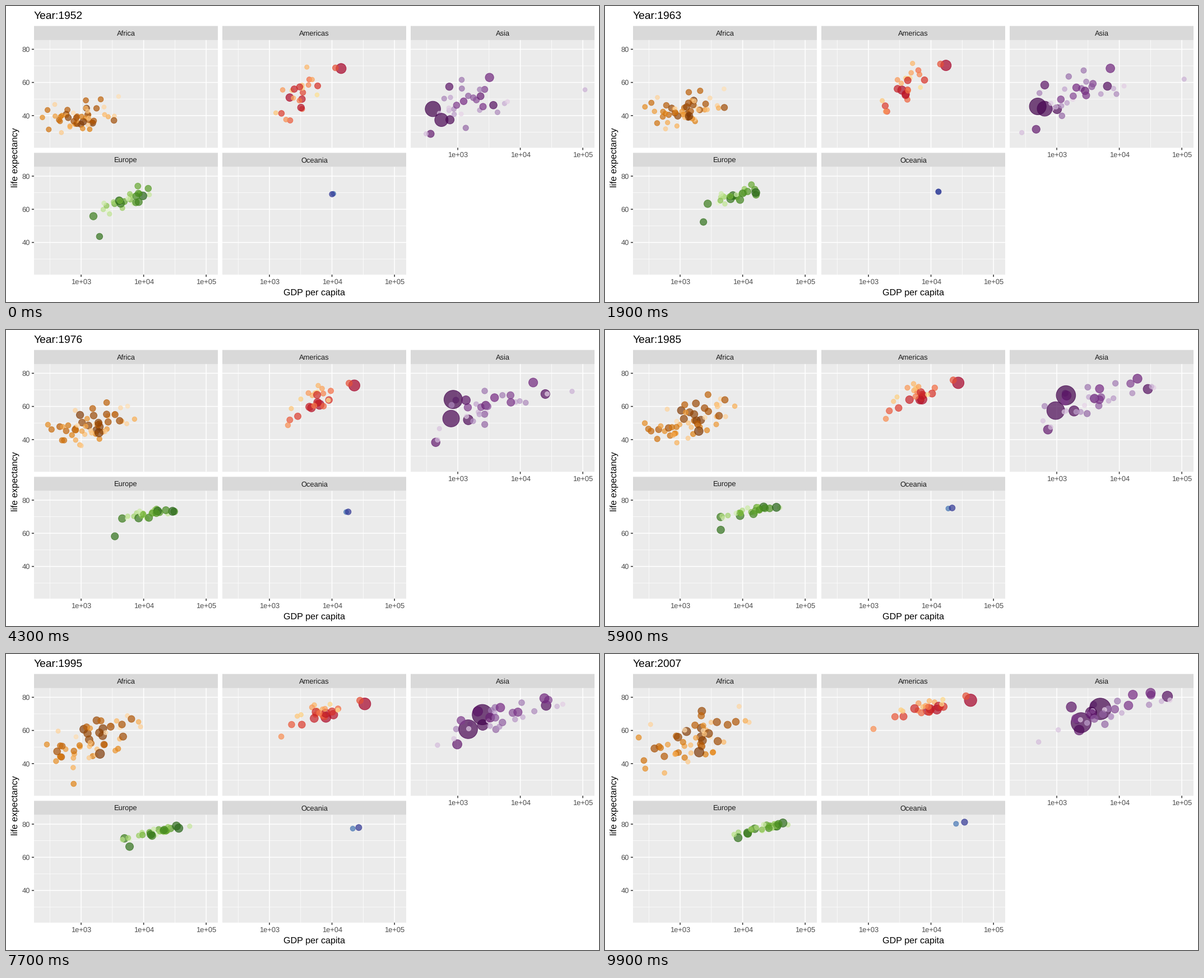
A matplotlib script for the animation above (10 s loop, 1058 by 529 pixels).

```python
import matplotlib.pyplot as plt
import numpy as np
from matplotlib.animation import FuncAnimation
from matplotlib.colors import LinearSegmentedColormap
from matplotlib.patches import Rectangle

W, H, DPI = 1058, 529, 100
PX = 72 / DPI              # points per pixel
PT = 1.463                 # pixels per point of the plot theme
FRAMES = 100
YEARS = np.linspace(1952, 2007, FRAMES)
WAVES = np.arange(1952, 2008, 5)
ERAS = (1952, 1972, 1992, 2007)
PANEL_W, PANEL_H, STRIP_H = 328, 192.5, 25.2
LOG_MIN, LOG_PX = 2.2486, 111.56
LIFE_MAX, LIFE_PX = 85.553, 2.963
POP_MIN, POP_MAX = .06, 1319   # millions

plt.rcParams["font.family"] = "Liberation Sans"
plt.rcParams["text.hinting"] = "none"
rng = np.random.default_rng(7)

# title, left, top of plot area, colours from most to least populous
PANELS = [
    ("Africa", 50, 60.9, ["#7F3B08", "#B35806", "#E08214", "#FDB863", "#FEE0B6"]),
    ("Americas", 386, 60.9, ["#A50026", "#D73027", "#F46D43", "#FDAE61", "#FEE090"]),
    ("Asia", 722, 60.9, ["#40004B", "#762A83", "#9970AB", "#C2A5CF", "#E7D4E8"]),
    ("Europe", 50, 287.6, ["#276419", "#4D9221", "#7FBC41", "#B8E186", "#E6F5D0"]),
    ("Oceania", 386, 287.6, ["#313695", "#4575B4"]),
]

# Clouds of ordinary countries. For each era: mean and spread of log income,
# mean life expectancy, years of life per decade of income, spread around that.
CLOUDS = {
    "Africa": dict(count=50, largest=80, growth=3.6, eras=[
        (2.99, .29, 39.1, 5, 4.6), (3.16, .32, 47.5, 8, 5.2),
        (3.17, .37, 54, 15, 6), (3.22, .42, 54.8, 10, 7.5)]),
    "Americas": dict(count=21, largest=109, growth=3.2, eras=[
        (3.48, .18, 53, 22, 6.5), (3.70, .18, 62.3, 18, 4.5),
        (3.76, .20, 69.8, 11, 2.8), (3.90, .23, 73.6, 9, 2)]),
    "Asia": dict(count=28, largest=170, growth=3.2, eras=[
        (3.13, .33, 46.5, 10, 7.5), (3.41, .46, 57, 11, 6),
        (3.60, .50, 66.3, 10, 4.5), (3.76, .50, 70.5, 9, 4)]),
    "Europe": dict(count=29, largest=82, growth=1.25, eras=[
        (3.70, .24, 65.1, 18, 2.5), (4.06, .19, 71, 7, 1.4),
        (4.15, .27, 74.5, 9, 1), (4.34, .23, 77.7, 8, 1)]),
}

# Outstanding countries: population at start and end,
# then a few bends given as (year, income, life expectancy).
LEADERS = {
    "Africa": [
        (33, 135, (1952, 1077, 36.3), (1977, 1981, 44.5), (2007, 2014, 46.9)),
        (2.5, 8.9, (1952, 493, 40), (1987, 848, 44), (1992, 737, 23.6), (2007, 863, 46.2)),
    ],
    "Americas": [
        (158, 301, (1952, 13990, 68.4), (2007, 42952, 78.2)),
        (15, 33, (1952, 11367, 68.8), (2007, 36319, 80.7)),
        (57, 190, (1952, 2109, 50.9), (1977, 6660, 61.5), (2007, 9066, 72.4)),
        (3.2, 8.5, (1952, 1840, 37.6), (1982, 2011, 51.5), (2007, 1202, 60.9)),
    ],
    "Asia": [
        (556, 1319, (1952, 400, 44), (1962, 488, 44.5), (1972, 677, 63.1), (2007, 4959, 73)),
        (372, 1110, (1952, 547, 37.4), (1982, 856, 56.6), (2007, 2452, 64.7)),
        (82, 224, (1952, 750, 37.5), (2007, 3541, 70.7)),
        (86, 127, (1952, 3217, 63), (1972, 14779, 73.4), (2007, 31656, 82.6)),
        (.2, 2.5, (1952, 108382, 55.6), (1972, 109348, 67.7), (1982, 31354, 71.3), (2007, 47307, 77.6)),
    ],
    "Europe": [
        (22, 71, (1952, 1969, 43.6), (1962, 2323, 52.1), (2007, 8458, 71.8)),
    ],
    "Oceania": [
        (8.7, 20.4, (1952, 10040, 69.1), (1972, 16789, 71.9), (2007, 34435, 81.2)),
        (2, 4.1, (1952, 10557, 69.4), (1972, 16046, 71.9), (2007, 25185, 80.2)),
    ],
}


def drift(count, memory=.97):
    """Slowly wandering standard scores, one row per wave."""
    z = rng.normal(size=count)
    rows = []
    for _ in WAVES:
        z = (z - z.mean()) / z.std()
        rows.append(np.clip(z, -2.1, 2.1))
        z = memory * z + np.sqrt(1 - memory ** 2) * rng.normal(size=count)
    return np.array(rows)


def cloud(count, largest, growth, eras):
    """Tracks of ordinary countries as (start pop, end pop, log income, life)."""
    mean, spread, life, slope, noise = (
        np.interp(WAVES, ERAS, column)[:, None] for column in zip(*eras))
    offset = spread * drift(count)
    log_gdp = mean + offset
    age = np.clip(life + slope * offset + noise * drift(count), 29, 82.3)
    pops = largest * np.exp(-5.6 * np.linspace(0, 1, count) ** 1.35)
    return [(pop / growth, pop, np.interp(YEARS, WAVES, log_gdp[:, i]),
             np.interp(YEARS, WAVES, age[:, i])) for i, pop in enumerate(pops)]


def leader(pop0, pop1, *bends):
    when, gdp, life = zip(*bends)
    return pop0, pop1, np.interp(YEARS, when, np.log10(gdp)), np.interp(YEARS, when, life)


fig = plt.figure(figsize=(W / DPI, H / DPI), dpi=DPI, facecolor="white")
ax = fig.add_axes([0, 0, 1, 1])
ax.set(xlim=(0, W), ylim=(H, 0))
ax.axis("off")


def px_x(left, log_gdp):
    return left + .2 + (log_gdp - LOG_MIN) * LOG_PX


def px_y(top, life):
    return top + (LIFE_MAX - life) * LIFE_PX


def line(x, y, color, width):
    ax.plot(x, y, color=color, lw=width * PX, solid_capstyle="butt", snap=False, zorder=1)


def label(x, y, text, points, color, ha="center", **kw):
    return ax.text(x, y, text, size=points * PT * PX, color=color, ha=ha, va="baseline", **kw)


def draw_panel(title, left, top):
    for y, h, color in ((top - STRIP_H, STRIP_H, "#D9D9D9"), (top, PANEL_H, "#EBEBEB")):
        ax.add_patch(Rectangle((left, y), PANEL_W, h, fc=color, lw=0, zorder=0, snap=False))
    label(left + PANEL_W / 2, top - 8, title, 8.8, "#1A1A1A")
    right, bottom = left + PANEL_W, top + PANEL_H
    for width, logs, lives in ((.78, (2.5, 3.5, 4.5), (30, 50, 70)), (1.56, (3, 4, 5), (40, 60, 80))):
        for life in lives:
            line([left, right], [px_y(top, life)] * 2, "white", width)
        for log in logs:
            line([px_x(left, log)] * 2, [top, bottom], "white", width)
    if title in ("Africa", "Europe"):
        for life in (40, 60, 80):
            y = px_y(top, life)
            line([left - 4, left], [y, y], "#333333", 1.56)
            label(left - 7, y + 4.6, str(life), 8.8, "#4D4D4D", ha="right")
    if title in ("Asia", "Europe", "Oceania"):
        for log in (3, 4, 5):
            x = px_x(left, log)
            line([x, x], [bottom, bottom + 4], "#333333", 1.56)
            label(x, bottom + 16.8, f"1e+0{log}", 8.8, "#4D4D4D")


def dot_area(pop):
    size = 2 + 10 * np.sqrt((pop - POP_MIN).clip(0) / (POP_MAX - POP_MIN))
    radius = .375 * (size * 2.845 + .945) * PT
    return (2 * radius * PX) ** 2


tracks, areas, colors = [], [], []
for title, left, top, shades in PANELS:
    draw_panel(title, left, top)
    dots = [leader(*spec) for spec in LEADERS[title]]
    if title in CLOUDS:
        dots += cloud(**CLOUDS[title])
    dots.sort(key=lambda dot: -dot[1])
    ramp = LinearSegmentedColormap.from_list(title, shades, N=512)
    for rank, (pop0, pop1, log_gdp, life) in enumerate(dots):
        tracks.append(np.column_stack([px_x(left, log_gdp), px_y(top, life)]))
        areas.append(dot_area(np.linspace(pop0, pop1, FRAMES)))
        colors.append(ramp(rank / (len(dots) - 1))[:3] + (.7,))

# Mix the stacking so that pale dots also lie below dark ones.
order = rng.permutation(len(tracks))
tracks, areas, colors = (np.array(part)[order] for part in (tracks, areas, colors))

label(550, 517, "GDP per capita", 11, "black")
label(20.5, 271, "life expectancy", 11, "black", rotation=90, rotation_mode="anchor")
year_text = label(50, 22.8, "", 13.2, "black", ha="left")
bubbles = ax.scatter(*tracks[:, 0].T, s=areas[:, 0], facecolors=colors,
                     edgecolors=colors, linewidths=1.03 * PX, zorder=2)


def update(i):
    bubbles.set_offsets(tracks[:, i])
    bubbles.set_sizes(areas[:, i], DPI)
    year_text.set_text(f"Year:{round(YEARS[i])}")
    return bubbles, year_text


anim = FuncAnimation(fig, update, frames=FRAMES, interval=100, repeat=True, repeat_delay=0)
plt.show()
```
